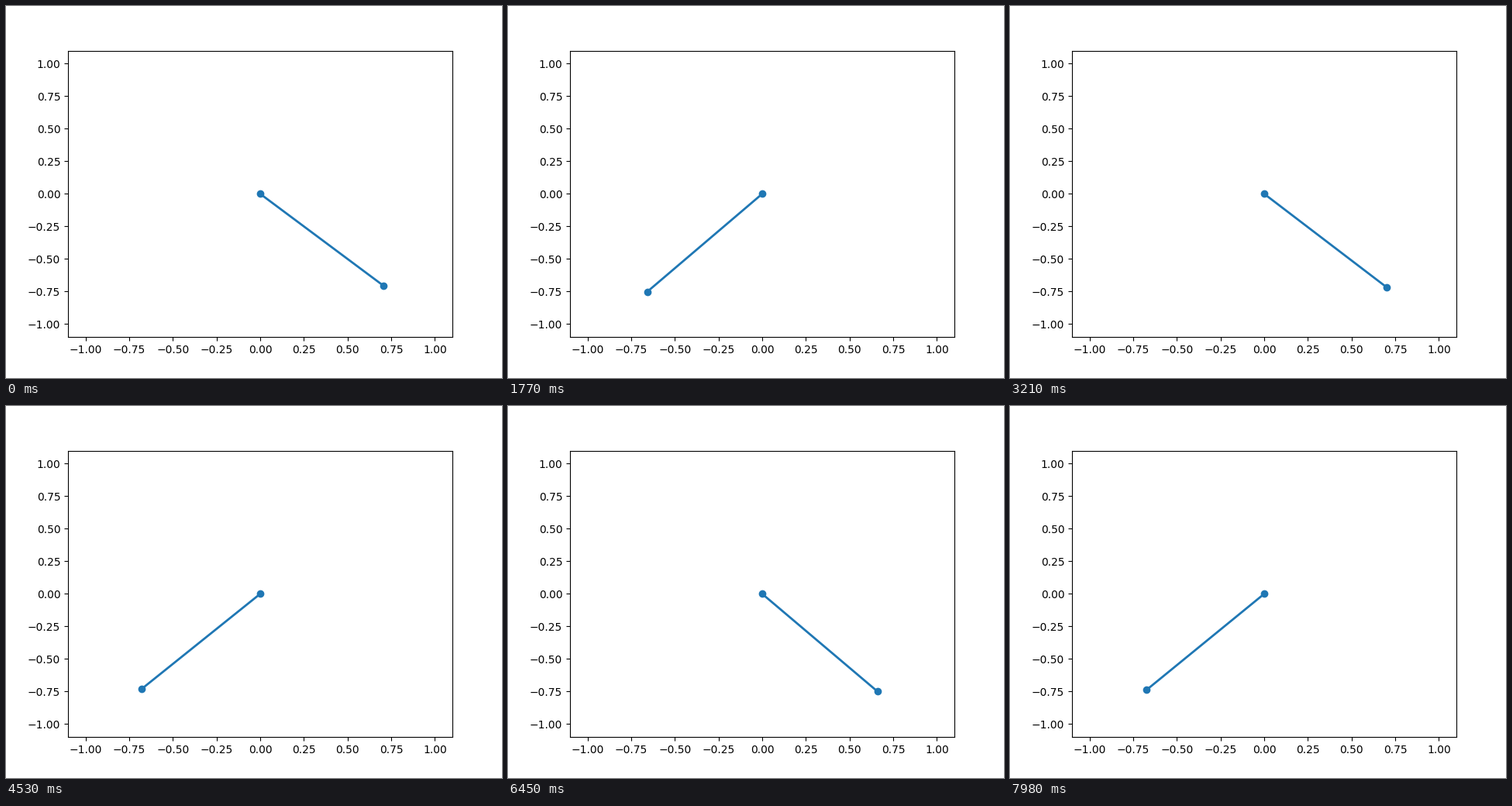
A matplotlib script for the animation above (8 s loop, 640 px wide and 480 px high).

```python
import numpy as np
import matplotlib.pyplot as plt
from matplotlib.animation import FuncAnimation

LOOP_MS = 8000
FRAMES = 267
GRAVITY = 9.81
LENGTH = 1.0
STEP = 10 / 499      # simulated seconds per frame
SUBSTEPS = 4


def slope(state):
    theta, omega = state
    return np.array([omega, -GRAVITY / LENGTH * np.sin(theta)])


def rk4(state, h):
    a = slope(state)
    b = slope(state + h / 2 * a)
    c = slope(state + h / 2 * b)
    d = slope(state + h * c)
    return state + h / 6 * (a + 2 * b + 2 * c + d)


def swing(theta0):
    """Angle of a frictionless pendulum, released at rest, for every frame."""
    state = np.array([theta0, 0.0])
    angles = []
    for _ in range(FRAMES):
        angles.append(state[0])
        for _ in range(SUBSTEPS):
            state = rk4(state, STEP / SUBSTEPS)
    return np.array(angles)


theta = swing(np.pi / 4)
bob_x = LENGTH * np.sin(theta)
bob_y = -LENGTH * np.cos(theta)

fig, ax = plt.subplots(figsize=(6.4, 4.8), dpi=100)
ax.set_xlim(-1.1, 1.1)
ax.set_ylim(-1.1, 1.1)
rod, = ax.plot([], [], "o-", lw=2)


def update(i):
    rod.set_data([0, bob_x[i]], [0, bob_y[i]])
    return rod,


def init():
    return update(0)


anim = FuncAnimation(fig, update, frames=FRAMES, init_func=init,
                     interval=LOOP_MS / FRAMES, repeat=True, repeat_delay=0,
                     blit=True)
plt.show()
```
